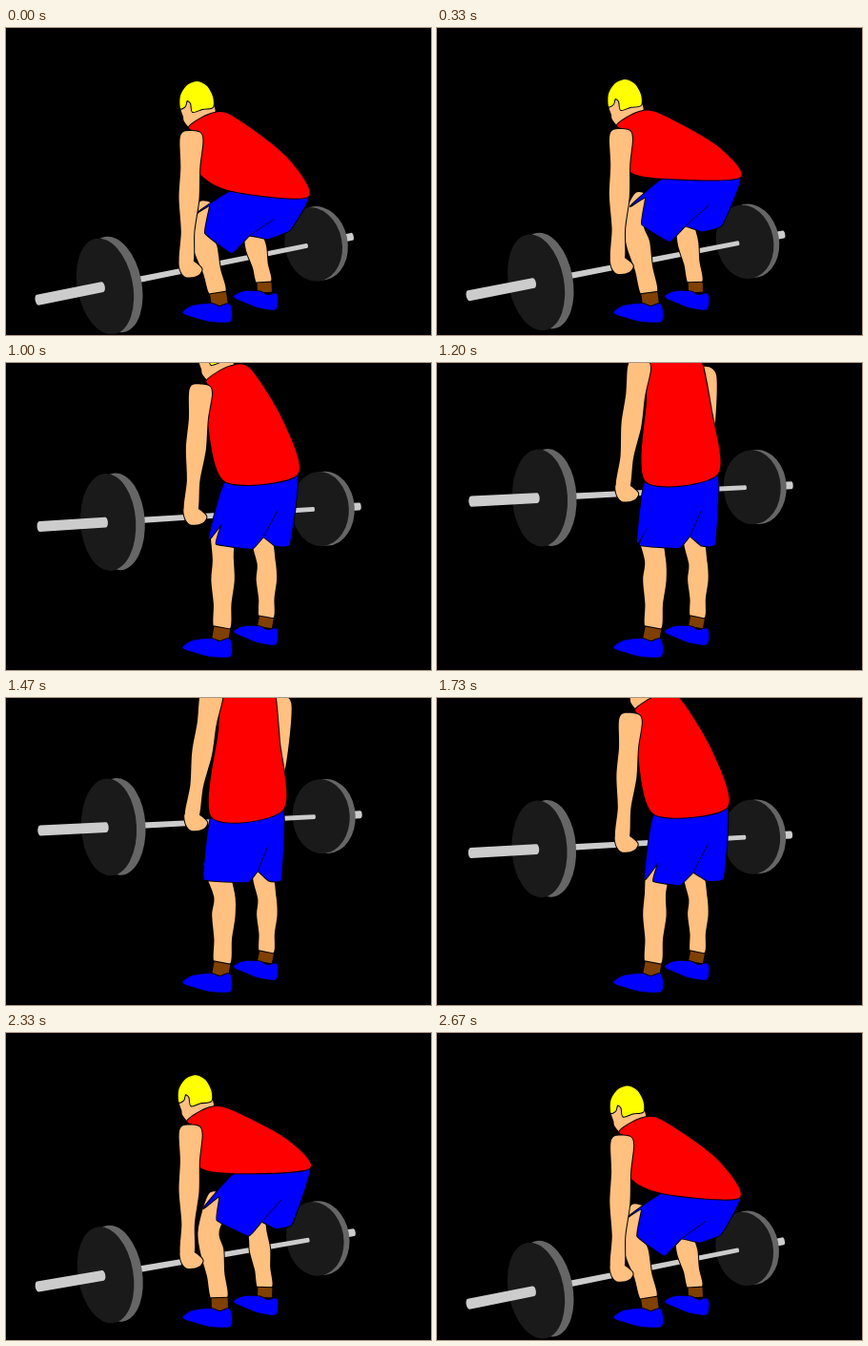
These frames come from a looping animation (446 by 322 pixels, 2.74 s). An HTML page with a canvas:

```html
<!DOCTYPE html>
<html lang="en">
<head>
<meta charset="utf-8">
<title>Deadlift</title>
<style>
html, body { margin: 0; width: 100%; height: 100%; overflow: hidden; background: #000; }
canvas { display: block; }
</style>
</head>
<body>
<canvas id="stage" width="446" height="322"></canvas>
<script>
const ctx = document.getElementById('stage').getContext('2d');
const LOOP = 2740, FRAME = 200 / 3;
const SKIN = '#ffc080', RED = '#f00', BLUE = '#00f', YELLOW = '#ff0', BROWN = '#804000';

const add = (p, x, y) => [p[0] + x, p[1] + y];
const lerp = (a, b, k) => a.map((v, i) => v + (b[i] - v) * k);
const pairs = list => list.flatMap((v, i) => i % 2 ? [] : [[v, list[i + 1]]]);

// The few joints that drive the body; the rest follows from them.
const crouch = { lift: [271], neck: [192, 104], seat: [317, 177], waist: [237, 171], knee: [204, 212],
  front: [199, 195], hemFront: [209, 215], hemMid: [237, 236], hemBack: [298, 212] };
const rise = { lift: [267], neck: [189, 102], seat: [318, 157], waist: [238, 158], knee: [206, 204],
  front: [203, 187], hemFront: [215, 206], hemMid: [244, 224], hemBack: [299, 207] };
const pull = { lift: [216.5], neck: [192, 64], seat: [319, 118], waist: [244, 127], knee: [224, 206],
  front: [215, 179], hemFront: [228, 188], hemMid: [264, 197], hemBack: [304, 190] };
const stand = { lift: [141.5], neck: [227, -8], seat: [294, 117], waist: [219, 124], knee: [229, 206],
  front: [210, 189], hemFront: [213, 191], hemMid: [254, 194], hemBack: [292, 190] };
const lower = { lift: [158], neck: [209, 11], seat: [304, 115], waist: [228, 122], knee: [229, 206],
  front: [218, 190], hemFront: [227, 192], hemMid: [255, 196], hemBack: [301, 189] };
const hinge = { lift: [230.5], neck: [190, 75], seat: [319, 123], waist: [242, 132], knee: [221, 206],
  front: [213, 180], hemFront: [227, 188], hemMid: [263, 200], hemBack: [301, 193] };

const mapPose = fn => Object.fromEntries(Object.keys(crouch).map(joint =>
  [joint, crouch[joint].map((_, i) => fn(joint, i))]));
const mix = (a, b, k) => mapPose((joint, i) => a[joint][i] + (b[joint][i] - a[joint][i]) * k);

const lockout = mix(stand, lower, -.4);
const settle = mix(crouch, rise, .2);
const keys = [[0, crouch], [330, rise], [730, pull], [1200, stand], [1430, lockout],
  [1730, lower], [2070, hinge], [2670, settle], [LOOP, crouch]];

// Monotone cubic through the key poses.
function poseAt(t) {
  let k = 0;
  while (k < keys.length - 2 && keys[k + 1][0] <= t) k++;
  const span = keys[k + 1][0] - keys[k][0], s = (t - keys[k][0]) / span;
  return mapPose((joint, i) => {
    const value = n => keys[n][1][joint][i];
    const slope = n => (value(n + 1) - value(n)) / (keys[n + 1][0] - keys[n][0]);
    const tangent = n => {
      if (n === 0 || n === keys.length - 1) return 0;
      const a = slope(n - 1), b = slope(n);
      return a * b > 0 ? 2 * a * b / (a + b) : 0;
    };
    const a = value(k), b = value(k + 1);
    return a + (b - a) * s * s * (3 - 2 * s)
      + span * s * (1 - s) * (tangent(k) * (1 - s) - tangent(k + 1) * s);
  });
}

function outline(points, bend) {
  const path = new Path2D(), n = points.length;
  const at = i => points[(i + n) % n];
  path.moveTo(...points[0]);
  for (let i = 0; i < n; i++) {
    const [a, b, c, d] = [at(i - 1), at(i), at(i + 1), at(i + 2)];
    path.bezierCurveTo(b[0] + (c[0] - a[0]) * bend, b[1] + (c[1] - a[1]) * bend,
      c[0] - (d[0] - b[0]) * bend, c[1] - (d[1] - b[1]) * bend, ...c);
  }
  path.closePath();
  return path;
}

// Outlining first lets shapes of one colour join without a seam.
function paint(color, shapes, bend = .14) {
  const paths = shapes.map(points => outline(points, bend));
  ctx.strokeStyle = '#000';
  ctx.lineWidth = 2;
  paths.forEach(p => ctx.stroke(p));
  ctx.fillStyle = color;
  paths.forEach(p => ctx.fill(p));
}

// Outline of a limb from its centre line and half widths.
function limb(line, widths) {
  const side = sign => line.map((p, i) => {
    const a = line[Math.max(0, i - 1)], b = line[Math.min(line.length - 1, i + 1)];
    const dx = b[0] - a[0], dy = b[1] - a[1], k = sign * widths[i] / Math.hypot(dx, dy);
    return add(p, -dy * k, dx * k);
  });
  return [...side(1), ...side(-1).reverse()];
}

const FACE = pairs([184,82, 186,93, 187,98, 194,105, 205,99, 219,93, 217,80, 200,74]);
const HAIR = pairs([183,84, 183,71, 190,60, 201,56, 211,61, 217,72, 217,83, 206,85, 196,88, 194,79, 190,76, 188,82]);
const SHOE = pairs([-25,-1, -15,-7, 4,-9, 13,-6, 23,-9, 26,-1, 24,10, 4,10, -15,5, -24,2]);
const HAND = pairs([-11,-9, 2,-9, 12,-1, 10,5, 4,8, -5,8, -10,2]);

function place(x, y, angle, scale, drawPart) {
  ctx.save();
  ctx.translate(x, y);
  ctx.rotate(angle);
  ctx.scale(scale, scale);
  drawPart();
  ctx.restore();
}

function disc(x, rx, ry, color) {
  ctx.fillStyle = color;
  ctx.beginPath();
  ctx.ellipse(x, 0, rx, ry, 0, 0, 7);
  ctx.fill();
}

function rod(x1, x2, h1, h2) {
  ctx.fillStyle = '#ccc';
  ctx.beginPath();
  ctx.ellipse(x2, 0, h2 * .5, h2, 0, -Math.PI / 2, Math.PI / 2);
  ctx.ellipse(x1, 0, h1 * .5, h1, 0, Math.PI / 2, Math.PI * 1.5);
  ctx.fill();
}

function drawLeg(hip, knee, ankle, size, sole) {
  const calf = lerp(knee, ankle, .3), shin = lerp(knee, ankle, .65);
  paint(SKIN, [limb([hip, knee, calf, shin, ankle], [11, 11, 12.2, 9.3, 8.3].map(w => w * size))]);
  paint(BROWN, [limb([ankle, sole], [8.5 * size, 8.5 * size])], 0);
}

function draw(pose) {
  const { neck, seat, waist, knee, front, hemFront, hemMid, hemBack } = pose;
  const barY = pose.lift[0];
  const drop = Math.max(0, (barY - 142) / 129);
  const bar = [108 - 4 * drop, barY, -.05 - .149 * drop ** 1.5];
  const onBar = d => add(bar, d * Math.cos(bar[2]), d * Math.sin(bar[2])).slice(0, 2);

  ctx.fillStyle = '#000';
  ctx.fillRect(0, 0, 446, 322);

  place(...bar, 1, () => {
    rod(250, 264, 4, 4);
    disc(229, 30, 39, '#666');
    disc(223, 30, 39, '#1a1a1a');
    rod(30, 216, 3.2, 2.4);
  });

  const bend = knee[0] - 204;
  const farKnee = [259 + bend * .6, knee[1] + 4];
  const slit = add(lerp(front, hemFront, .5), 10, -19);
  drawLeg(add(farKnee, -5, -26), farKnee, [271 + bend * .1, 267], .88, [271.5, 277]);
  drawLeg(slit, knee, [222.5 + bend * .18, 278], 1, [224.5, 291]);
  place(262, 284, .12, .9, () => paint(BLUE, [SHOE]));
  place(211, 298, 0, 1, () => paint(BLUE, [SHOE]));

  const farShoulder = add(neck, 55, 20);
  paint(SKIN, [limb([farShoulder, lerp(farShoulder, onBar(170), .65)], [11, 9])]);

  const crotch = add(lerp(hemBack, hemMid, .7), 0, -11);
  paint(BLUE, [[waist, seat, hemBack, lerp(hemBack, hemMid, .38), crotch, hemMid, hemFront, slit, front]], .05);
  ctx.lineWidth = .8;
  ctx.beginPath();
  ctx.moveTo(...crotch);
  ctx.lineTo(...lerp(crotch, seat, .42));
  ctx.stroke();

  place(neck[0] - 192, neck[1] - 104, 0, 1, () => {
    paint(SKIN, [FACE]);
    paint(YELLOW, [HAIR]);
  });

  const shoulder = add(neck, 3 - (neck[0] - 191) * .5, 14);
  const upperBack = add(neck, 45, -12);
  const lowerBack = add(lerp(upperBack, seat, .5), (seat[0] - upperBack[0]) * .21, 0);
  paint(RED, [[neck, add(neck, 23, -14), upperBack, lowerBack, seat, waist,
    add(shoulder, 8, 33), add(shoulder, 10, -4)]]);

  const wrist = add(onBar(91), -4, -6);
  const armLine = [-.07, 0, .22, .47, .74, 1].map(k => lerp(shoulder, wrist, k));
  const hand = HAND.map(p => add(onBar(91), ...p));
  paint(SKIN, [limb(armLine, [8, 12, 10, 10.5, 6.8, 7]), hand]);

  place(...bar, 1, () => {
    disc(10, 28.5, 51, '#666');
    disc(0, 29, 51, '#1a1a1a');
    rod(-72, -3, 5.6, 5.4);
  });
}

const start = performance.now();
function tick() {
  const t = (performance.now() - start) % LOOP;
  const step = Math.min(40, Math.floor((t + 3.4) / FRAME));
  draw(poseAt(step * FRAME));
  requestAnimationFrame(tick);
}
tick();
</script>
</body>
</html>
```
